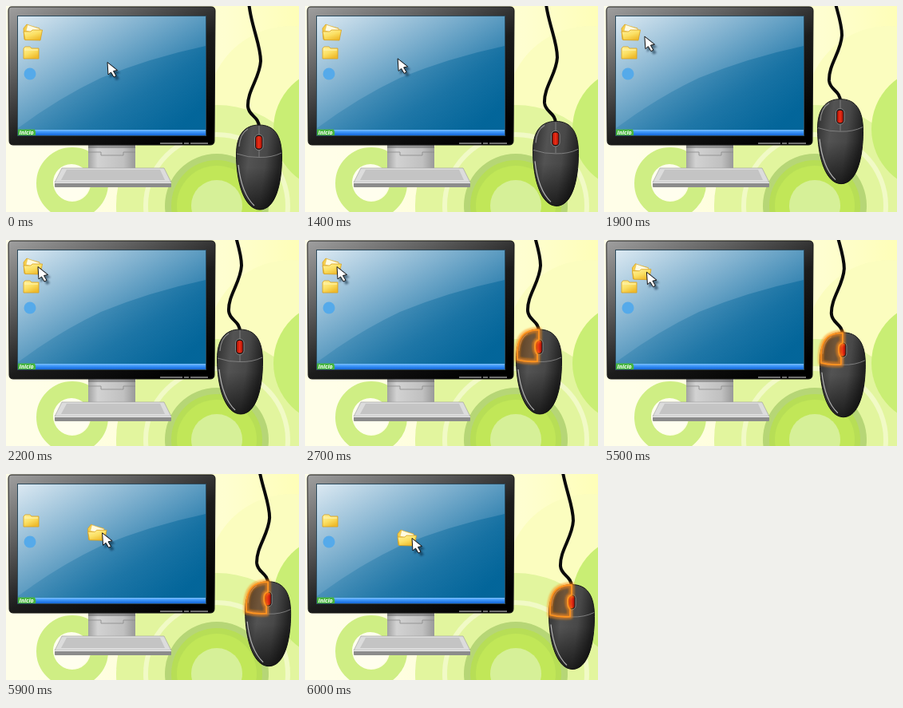
An HTML page that plays this animation: 367 px wide and 258 px high, repeating every 8 s.

```html
<!DOCTYPE html>
<html lang="es">
<head>
<meta charset="utf-8">
<title>Arrastrar</title>
<style>
html, body { margin: 0; width: 100%; height: 100%; overflow: hidden; background: #fdfdd2; }
svg { display: block; width: 100vw; height: 100vh; }
text { font: italic bold 7px "Open Sans", "DejaVu Sans", sans-serif; fill: #fff; }
</style>
</head>
<body>
<svg viewBox="0 0 367 258">
  <defs>
    <linearGradient id="sky"><stop offset=".1" stop-color="#fffee8"/><stop offset=".75" stop-color="#fefed0"/><stop offset="1" stop-color="#fefeb8"/></linearGradient>
    <linearGradient id="screen" x1="0" y1="0" x2=".85" y2=".9"><stop offset="0" stop-color="#dce9f2"/><stop offset=".4" stop-color="#80b1cf"/><stop offset=".75" stop-color="#2d7fae"/><stop offset="1" stop-color="#0c6a9f"/></linearGradient>
    <linearGradient id="dune" x1="0" y1=".2" x2="1" y2=".6"><stop offset="0" stop-color="#2d7fae" stop-opacity=".2"/><stop offset="1" stop-color="#006498" stop-opacity=".75"/></linearGradient>
    <linearGradient id="case" x2=".8" y2="1"><stop offset="0" stop-color="#a0a0a0"/><stop offset=".3" stop-color="#606060"/><stop offset=".6" stop-color="#1c1c1c"/><stop offset="1" stop-color="#000"/></linearGradient>
    <linearGradient id="bar" x2="0" y2="1"><stop offset="0" stop-color="#7cc0ff"/><stop offset=".4" stop-color="#3d97fa"/><stop offset="1" stop-color="#1566d8"/></linearGradient>
    <linearGradient id="neck"><stop offset="0" stop-color="#a2a2a2"/><stop offset=".2" stop-color="#d2d2d2"/><stop offset=".75" stop-color="#c0c0c0"/><stop offset="1" stop-color="#999"/></linearGradient>
    <linearGradient id="gold" x2=".6" y2="1"><stop offset="0" stop-color="#fff3a0"/><stop offset=".55" stop-color="#fbe064"/><stop offset="1" stop-color="#efbb2c"/></linearGradient>
    <linearGradient id="shell" x2="1" y2=".25"><stop offset="0" stop-color="#2c2c2c"/><stop offset=".35" stop-color="#535353"/><stop offset=".7" stop-color="#484848"/><stop offset="1" stop-color="#222"/></linearGradient>
    <linearGradient id="shade" x2="0" y2="1"><stop offset=".5" stop-color="#000" stop-opacity="0"/><stop offset="1" stop-color="#000" stop-opacity=".6"/></linearGradient>
    <linearGradient id="wheel"><stop offset="0" stop-color="#a81206"/><stop offset=".5" stop-color="#ee3018"/><stop offset="1" stop-color="#a81206"/></linearGradient>
    <filter id="soft" x="-30%" y="-30%" width="160%" height="160%"><feGaussianBlur stdDeviation="1.1"/></filter>
    <path id="body" d="M317 149C336 149 345.500 162 345.500 189C345.500 224 337 255 318 255C299 255 288.500 222 288.500 186C288.500 161 299 149 317 149Z"/>
    <path id="button" d="M290 187C289 171 292 158 301 153Q308 149.500 317 149.500V162Q312 163 312 170T315 180L315 189Q301 190 290 187Z"/>
  </defs>

  <rect width="367" height="258" fill="url(#sky)"/>
  <circle cx="357" cy="130" r="105" fill="#fbfdbf"/>
  <circle cx="83" cy="222" r="34" fill="none" stroke="#cfee84" stroke-width="22"/>
  <circle cx="82" cy="221" r="23" fill="#fffeee"/>
  <circle cx="264" cy="250" r="126" fill="#e2f59e"/>
  <circle cx="412" cy="154" r="77" fill="#c9ee74"/>
  <circle cx="264" cy="250" r="89" fill="none" stroke="#f1fac6" stroke-width="6"/>
  <circle cx="264" cy="250" r="65" fill="#b6d676"/>
  <circle cx="264" cy="250" r="57" fill="#b7de56"/>
  <circle cx="264" cy="250" r="50" fill="#c1e758"/>
  <circle cx="264" cy="250" r="32" fill="#d6f098"/>

  <path d="M103 173H162V204H103Z" fill="url(#neck)"/>
  <path d="M103 174H162V178H103Z" fill="#555" opacity=".45"/>
  <path d="M103 183H119V187H147V183H162" fill="none" stroke="#888" stroke-width=".8"/>
  <path d="M70 203H198L207 221H61Z" fill="#dcdcdc" stroke="#999" stroke-width=".6"/>
  <path d="M76 205H193L199 218H69Z" fill="#c4c4c4"/>
  <path d="M61 221H207V226Q207 227 206 227H62Q61 227 61 226Z" fill="#8c8c8c"/>
  <path d="M61 221.500H207" stroke="#eee"/>

  <path d="M7 1H257Q262 1 262 6L261 169Q261 174 256 174H9Q4 174 4 169L3 6Q3 1 7 1Z" fill="url(#case)" stroke="#161616"/>
  <path d="M193 172H253" stroke="#ddd" stroke-width="1.200" stroke-dasharray="28 2 6 2"/>
  <rect x="14.500" y="12.500" width="236" height="150" fill="url(#screen)" stroke="#2b4a5c"/>
  <path d="M15 153Q66 115 119 90Q180 65 250 50V162H15Z" fill="url(#dune)"/>
  <rect x="15" y="155" width="235" height="7" fill="url(#bar)"/>
  <path d="M15 154.500H36Q38 158 37 162H15Z" fill="#46b53e"/>
  <text x="16.500" y="160.700">Inicio</text>

  <path d="M22 66V53L24 51H30L32 53H41V66Z" fill="url(#gold)" stroke="#d9a01c" stroke-width=".8"/>
  <path d="M23 55H40" stroke="#fff6b8"/>
  <circle cx="30" cy="85" r="7.500" fill="#55aaea"/>

  <g id="folder" stroke-linejoin="round">
    <path d="M23 42L22 28L26 23L31 25L42 28V41Z" fill="#f6cf4c" stroke="#d9a01c" stroke-width=".8"/>
    <path d="M25 31L27 23.500L42 28.500L43 36Z" fill="#fffbe0" stroke="#e0bd55" stroke-width=".6"/>
    <path d="M22 32L31 32L33 30L45.500 30L43 43L24 42.500Z" fill="url(#gold)" stroke="#d9a01c" stroke-width=".8"/>
  </g>

  <g id="cursor">
    <path d="M130 73V90L134 87L138 93L142 91L138 85L143 84Z" fill="#001a33" opacity=".5" filter="url(#soft)"/>
    <path d="M127 70.500L128 86L131.500 83L135 89L138 87.500L134.500 81.500L139.500 80.500Z" fill="#fff" stroke="#111" stroke-linejoin="round"/>
  </g>

  <g id="mouse">
    <path d="M303 -20C304 22 319 45 319 69C318 90 302 106 303 126C304 138 317 138 317 152" fill="none" stroke="#0a0a0a" stroke-width="4"/>
    <use href="#body" fill="url(#shell)" stroke="#161616"/>
    <use href="#body" fill="url(#shade)"/>
    <path d="M289 185Q304 190 317 189.500Q333 190 345 184M317 150V189" fill="none" stroke="#858585" stroke-width=".9"/>
    <path d="M291 199Q295 235 311 250" fill="none" stroke="#ddd" stroke-width="1.200" opacity=".75"/>
    <path d="M292 176Q293 160 303 154" fill="none" stroke="#bbb" stroke-width="1.200" opacity=".6"/>
    <rect x="311.500" y="161" width="10.500" height="19.500" rx="5" fill="#151515" stroke="#9a9a9a" stroke-width=".8"/>
    <rect x="313" y="163" width="7.500" height="15.500" rx="3" fill="url(#wheel)"/>
    <g id="glow" stroke-linejoin="round" fill="none">
      <use href="#button" fill="#b45a08" fill-opacity=".3" stroke="#ff8a10" stroke-opacity=".55" stroke-width="7" filter="url(#soft)"/>
      <use href="#button" stroke="#ff9420" stroke-width="1.800"/>
    </g>
  </g>
</svg>
<script>
const el = id => document.getElementById(id);
const clamp = v => Math.min(1, Math.max(0, v));
const shift = (id, x, y) => el(id).setAttribute("transform", `translate(${x} ${y})`);

function draw() {
  // Film frames of 80 ms, shown every 100 ms
  const n = Math.floor(Math.floor(performance.now() % 8000 / 100) * 5 / 4);
  // Steady approach, then a slow last eighth
  const go = clamp((n - 16) / 8 * 8 / 7) * 7 / 8 + clamp((n - 23) / 4) / 8;
  const drag = clamp((n - 67) / 7);
  const pressed = n >= 28 && n < 30 || n >= 33;
  shift("cursor", -87 * go + 94 * drag, -37 * go + 47 * drag);
  shift("folder", 94 * drag, 47 * drag);
  shift("mouse", -24 * go + 41 * drag, -37 * go + 26.5 * drag);
  el("glow").setAttribute("opacity", pressed ? 1 : 0);
  requestAnimationFrame(draw);
}
draw();
</script>
</body>
</html>
```
